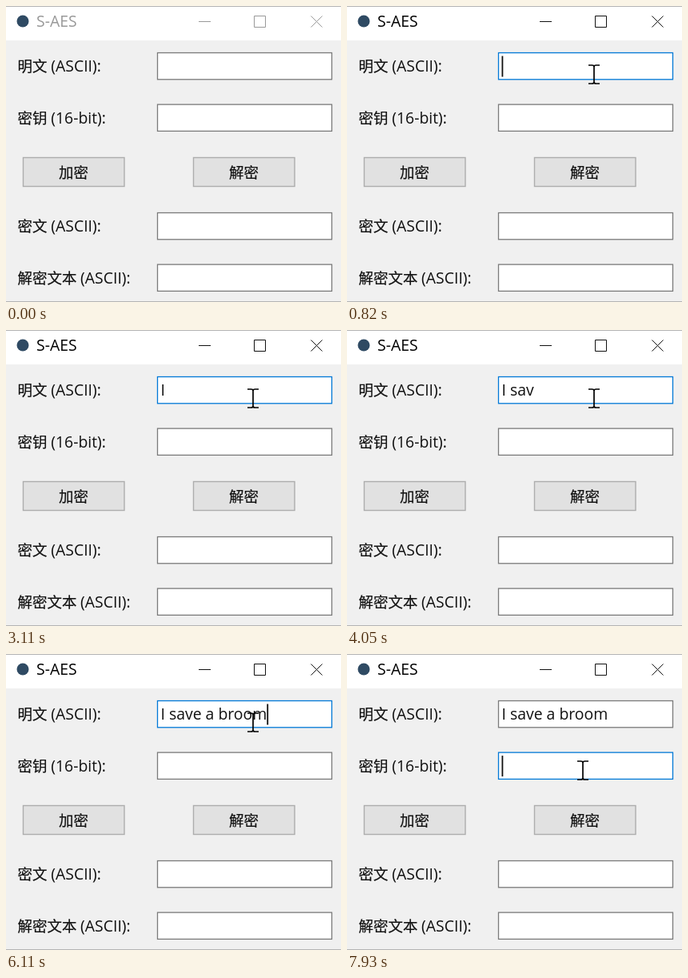
Recreate the animation shown at these times as an HTML page. Size 419 px wide and 370 px high, loop 8 s.

```html
<!DOCTYPE html>
<html lang="zh">
<head>
<meta charset="utf-8">
<title>S-AES</title>
<style>
  html, body { margin: 0; width: 100%; height: 100%; overflow: hidden; background: #f0f0f0; }
  svg { display: block; width: 100%; height: 100%; }
  text { font: 19.4px "Open Sans", "Noto Sans", sans-serif; white-space: pre; fill: #111; }
  .cjk { font: 18.5px "Noto Sans CJK SC", "Noto Sans CJK", sans-serif; stroke: #111; stroke-width: .2; }
  .field { fill: #fff; stroke-width: 1.3; }
  .button { fill: #e1e1e1; stroke: #adadad; stroke-width: 1.4; }
</style>
</head>
<body>
<svg viewBox="0 0 419 370">
  <rect width="419" height="370" fill="#f0f0f0"/>
  <rect width="419" height="43" fill="#fff"/>
  <path d="M0 .5H419M0 369.5H419" stroke="#b4b4b4"/>
  <circle cx="21" cy="19" r="7.5" fill="#2f4a63"/>
  <text id="title" x="38" y="26">S-AES</text>
  <path id="controls" d="M241 19.5H256M310.5 12.5h14v14h-14zM381.5 12.5l14 14m0-14l-14 14" fill="none"/>
  <g id="form"></g>
  <text id="typed" x="193.5" y="82"></text>
  <rect id="caret" width="1.8" height="26" fill="#111"/>
  <path id="arrow" d="M0 .5V22.5L5 18L9 26.5L12.5 25L8.8 17H16.5Z" fill="#fff" stroke="#222" stroke-width="1.2"/>
  <path id="beam" d="M-7-11h4.5q2.5 0 2.5 2q0-2 2.5-2H7M0-9V11M-7 12h4.5q2.5 0 2.5-2q0 2 2.5 2H7" fill="none" stroke="#000" stroke-width="1.7"/>
</svg>
<script>
const LOOP = 8000;
const FIELD = { x: 189.5, width: 218, height: 33.3 };
const BLINK_ON = 600, BLINK = 900;

// moments when each field takes the focus
const focusTimes = [690, 7020];

const bursts = [
  { text: "I ", at: 1420, gap: 480 },
  { text: "sa", at: 3450, gap: 70 },
  { text: "ve ", at: 4050, gap: 70 },
  { text: "a ", at: 4450, gap: 200 },
  { text: "broom", at: 5050, gap: 200 },
];

const home = { x: 348, y: 288 };
const moves = [
  { at: 70, end: 350, x: 295, y: 95 },
  { at: 550, end: 620, x: 309, y: 85 },
  { at: 6710, end: 6910, x: 295, y: 145 },
];

const rows = [["明文", "(ASCII):"], ["密钥", "(16-bit):"], ["密文", "(ASCII):"], ["解密文本", "(ASCII):"]];
const rowY = i => 58.5 + 64.6 * (i % 2) + 200 * Math.floor(i / 2);

const $ = id => document.getElementById(id);
const clamp = (v, lo, hi) => Math.min(hi, Math.max(lo, v));

function add(tag, attrs, text = "") {
  const el = document.createElementNS("http://www.w3.org/2000/svg", tag);
  for (const key in attrs) el.setAttribute(key, attrs[key]);
  el.textContent = text;
  return $("form").appendChild(el);
}

const fields = rows.map(([name, unit], i) => {
  const y = rowY(i);
  add("text", { class: "cjk", x: 14.5, y: y + 23.5 }, name);
  add("text", { x: 19.5 + name.length * 18.4, y: y + 23.5 }, unit);
  return add("rect", { class: "field", y, ...FIELD });
});

["加密", "解密"].forEach((name, i) => {
  const x = 21.5 + 213 * i;
  add("rect", { class: "button", x, y: 189.5, width: 126.5, height: 36 });
  add("text", { class: "cjk", x: x + 63, y: 214.5, "text-anchor": "middle" }, name);
});

function show(el, visible, x, y) {
  el.style.display = visible ? "" : "none";
  el.setAttribute("transform", `translate(${x} ${y})`);
}

function pointerAt(t) {
  return moves.reduce((pos, move) => {
    const p = clamp((t - move.at) / (move.end - move.at), 0, 1);
    return { x: pos.x + (move.x - pos.x) * p, y: pos.y + (move.y - pos.y) * p };
  }, home);
}

function typedAt(t) {
  return bursts.map(({ text, at, gap }) =>
    text.slice(0, Math.max(0, Math.floor((t - at) / gap) + 1))).join("");
}

function draw(t) {
  const focused = focusTimes.filter(time => time <= t).length - 1;
  const active = focused >= 0;
  $("title").style.fill = active ? "#000" : "#999";
  $("controls").setAttribute("stroke", active ? "#111" : "#999");

  const { x, y } = pointerAt(t);
  const visible = t >= moves[0].at;
  const hovered = visible ? fields.findIndex((_, i) => Math.abs(y - rowY(i) - FIELD.height / 2) < 17) : -1;
  show($("arrow"), visible && hovered < 0, x, y);
  show($("beam"), hovered >= 0, x, y);

  fields.forEach((field, i) => field.setAttribute("stroke",
    i === focused ? "#0078d7" : i === hovered ? "#171717" : "#7a7a7a"));

  $("typed").textContent = typedAt(t);
  const textWidth = focused === 0 ? $("typed").getComputedTextLength() : 0;
  const caretOn = active && (t - focusTimes[focused]) % BLINK < BLINK_ON;
  show($("caret"), caretOn, 193.5 + textWidth, active ? rowY(focused) + 4 : 0);
}

const start = performance.now();
function tick() {
  draw((performance.now() - start) % LOOP);
  requestAnimationFrame(tick);
}
tick();
</script>
</body>
</html>
```
